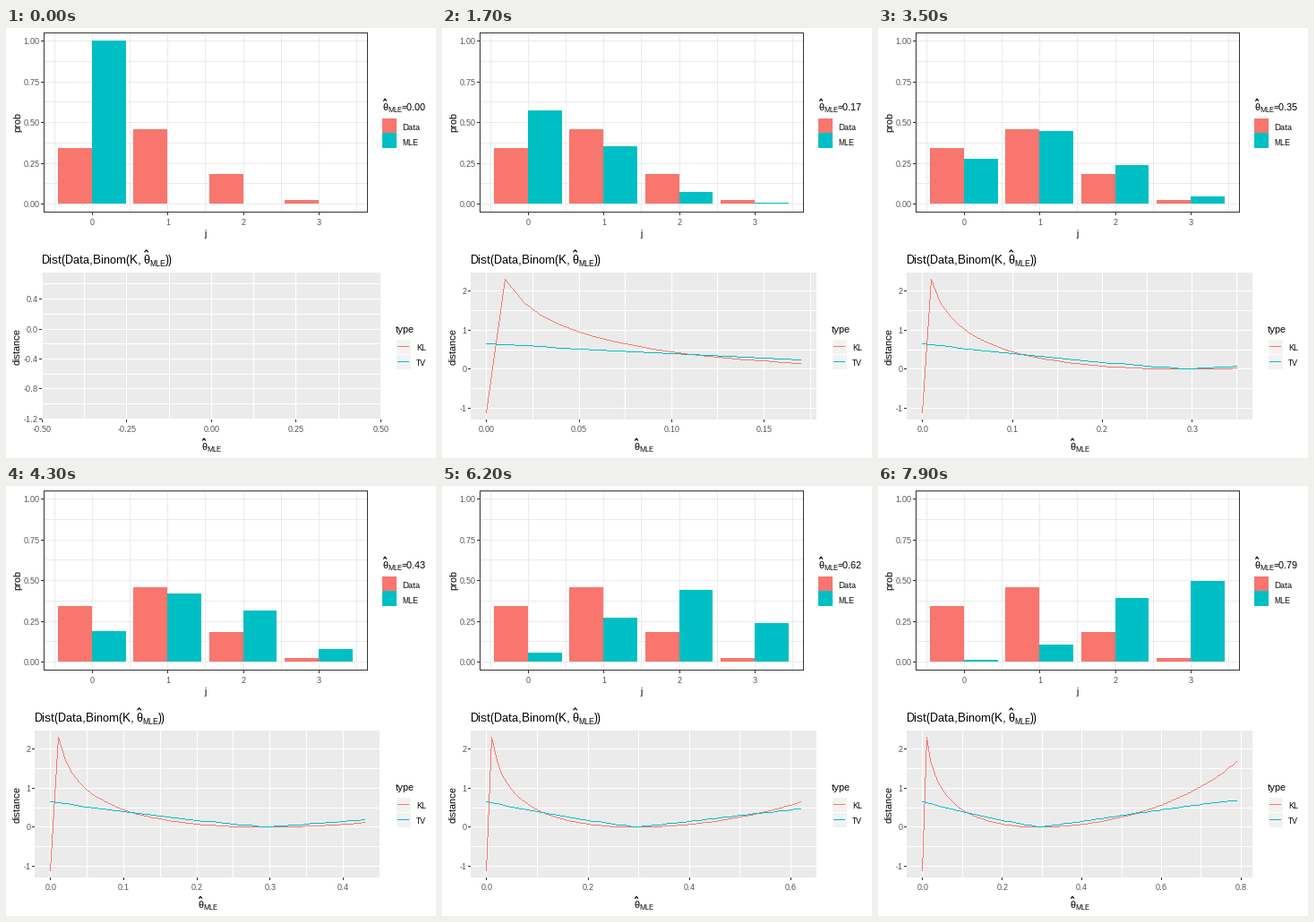
These frames come from a looping animation (480x480 px, 8000 ms). A matplotlib script:

```python
import math
from itertools import product

import numpy as np
import matplotlib.pyplot as plt
from matplotlib.animation import FuncAnimation
from matplotlib.lines import Line2D
from matplotlib.patches import Rectangle

SIZE, DPI, FRAMES = 480, 80, 80
PX = 72 / DPI  # points per pixel
RED, TEAL = "#F8766D", "#00BFC4"
GREY92, GREY95, GREY20, GREY30 = "#EBEBEB", "#F2F2F2", "#333333", "#4D4D4D"
TICK, BASE, TITLE = 9, 11, 13

K = 3
DATA = np.array([0.34, 0.456, 0.18, 0.024])

plt.rcParams.update({
    "font.family": "Liberation Sans",
    "text.hinting": "native",
    "text.hinting_factor": 1,
})
fig = plt.figure(figsize=(SIZE / DPI, SIZE / DPI), dpi=DPI, facecolor="white")
ax = fig.add_axes([0, 0, 1, 1])
canvas = ax.imshow(np.zeros((SIZE, SIZE, 4), np.uint8), zorder=2,
                   extent=(0, SIZE, SIZE, 0), aspect="auto",
                   interpolation="nearest")
ax.set_xlim(0, SIZE)
ax.set_ylim(SIZE, 0)
ax.axis("off")


# ---- statistics -----------------------------------------------------------

def binom(theta):
    return np.array([math.comb(K, j) * theta**j * (1 - theta)**(K - j)
                     for j in range(K + 1)])


def kl(theta):
    q = binom(theta)
    cross = DATA @ np.log(q) if theta > 0 else 0
    return float(DATA @ np.log(DATA) - cross)


def tv(theta):
    return float(np.abs(DATA - binom(theta)).sum() / 2)


THETA = np.arange(FRAMES) / 100
KL = np.array([kl(t) for t in THETA])
TV = np.array([tv(t) for t in THETA])


# ---- axis breaks (extended Wilkinson labelling) ---------------------------

def extended(lo, hi, m=5):
    steps = (1, 5, 2, 2.5, 4, 3)
    span, best, found = hi - lo, -2, (0, 1, 1)
    for j, (i, q), k in product((1, 2), enumerate(steps), range(2, 11)):
        z0 = math.ceil(math.log10(span / (k + 1) / (j * q)))
        for z in (z0, z0 + 1):
            step = j * q * 10.0**z
            first = math.floor(hi / step) * j - (k - 1) * j
            last = math.ceil(lo / step) * j
            for start in range(first, last + 1):
                a = start * step / j
                b = a + step * (k - 1)
                has_zero = start % j == 0 and a <= 1e-12 and b >= -1e-12
                simple = 1 - i / (len(steps) - 1) - j + has_zero
                cover = 1 - 0.5 * ((hi - b)**2 + (lo - a)**2) / (0.1 * span)**2
                ratio = (k - 1) / (b - a) * (max(b, hi) - min(a, lo)) / (m - 1)
                dense = 2 - max(ratio, 1 / ratio)
                score = 0.25 * simple + 0.2 * cover + 0.5 * dense + 0.05
                if score > best + 1e-12:
                    best, found = score, (a, step, k)
    a, step, k = found
    return [round(a + n * step, 9) + 0.0 for n in range(k)]


def breaks(lo, hi):
    major = [b for b in extended(lo, hi) if lo <= b <= hi]
    step = major[1] - major[0]
    mids = [major[0] - step / 2] + [b + step / 2 for b in major]
    return major, [b for b in mids if lo <= b <= hi]


def labels(values):
    digits = next(d for d in range(8)
                  if all(abs(v - round(v, d)) < 1e-8 for v in values))
    return [f"{v:.{digits}f}" for v in values]


def expand(lo, hi):
    pad = 0.05 * (hi - lo)
    return (lo - pad, hi + pad) if hi > lo else (lo - 0.5, hi + 0.5)


# ---- drawing helpers ------------------------------------------------------

def rect(x0, y0, x1, y1, color, z=1):
    x0, y0, x1, y1 = (math.floor(v) for v in (x0, y0, x1, y1))
    return ax.add_patch(Rectangle((x0, y0), x1 - x0, y1 - y0, fc=color,
                                  lw=0, antialiased=False, zorder=z))


def hline(x0, x1, y, color, z=1):
    return rect(x0, y, x1, y + 1, color, z)


def vline(x, y0, y1, color, z=1):
    return rect(x, y0, x + 1, y1, color, z)


def text(x, y, s, size=BASE, color="black", ha="left", rotation=0):
    return ax.text(x, y, s, size=size * PX, color=color, ha=ha, va="baseline",
                   rotation=rotation, rotation_mode="anchor")


def paint(img, x, y, color):
    """One-pixel polyline without smoothing."""
    rgba = [int(color[n:n + 2], 16) for n in (1, 3, 5)] + [255]
    pts = np.floor(np.column_stack([x, y])).astype(int)
    for a, b in zip(pts, pts[1:]):
        n = np.abs(b - a).max() + 1
        px, py_ = np.rint(np.linspace(a, b, n)).astype(int).T
        img[py_, px] = rgba


def theta_hat(x, y, size):
    """Theta with a hat and the subscript MLE, baseline at y."""
    mid, top, w = x + 0.28 * size, y - 1.17 * size, 0.16 * size
    hat = Line2D([mid - w, mid, mid + w], [top + 2.5, top, top + 2.5],
                 color="black", lw=1.2 * PX, solid_capstyle="butt")
    return [
        text(x, y, "θ", size),
        ax.add_line(hat),
        text(x + 0.556 * size, y + 0.2 * size, "MLE", round(0.7 * size)),
    ]


def scale(lo, hi, p0, p1):
    return lambda v: p0 + (np.asarray(v) - lo) / (hi - lo) * (p1 - p0)


def grid(xs, ys, xt, yt, box, color):
    x0, y0, x1, y1 = box
    out = [vline(xs(v), y0, y1, color) for part in xt for v in part]
    return out + [hline(x0, x1, ys(v), color) for part in yt for v in part]


def ticks(xs, ys, xt, yt, box):
    x0, _, _, y1 = box
    out = []
    for v, s in zip(xt, labels(xt)):
        out += [vline(xs(v), y1, y1 + 3, GREY20),
                text(xs(v), y1 + 14, s, TICK, GREY30, "center")]
    for v, s in zip(yt, labels(yt)):
        out += [hline(x0 - 3, x0, ys(v), GREY20),
                text(x0 - 4.6, math.floor(ys(v)) + 4, s, TICK, GREY30, "right")]
    return out


# ---- static parts ---------------------------------------------------------

TOP = (42, 5, 404, 206)
jx = scale(-0.645, 3.645, 42.12, 403.62)
py = scale(-0.05, 1.05, 205.7, 5.5)


def bars(values, offset, color):
    return [rect(jx(j + offset), py(v), jx(j + offset + 0.45), py(0), color)
            for j, v in enumerate(values)]


def draw_static():
    xt, yt = breaks(-0.645, 3.645), breaks(-0.05, 1.05)
    grid(jx, py, xt, yt, TOP, GREY92)
    ticks(jx, py, xt[0], yt[0], TOP)
    bars(DATA, -0.45, RED)
    x0, y0, x1, y1 = TOP
    for y in (y0, y1 - 1):
        hline(x0, x1, y, GREY20, 2)
    for x in (x0, x1 - 1):
        vline(x, y0, y1, GREY20, 2)
    text(222.5, 233, "j", ha="center")
    text(16, 105.5, "prob", ha="center", rotation=90)
    text(16, 355.5, "distance", ha="center", rotation=90)

    theta_hat(420, 92, BASE)
    rect(420, 101, 436, 117, RED)
    rect(420, 117, 436, 134, TEAL)
    text(442, 114, "Data", TICK)
    text(442, 131, "MLE", TICK)

    text(435, 340, "type")
    for y, color, name in ((347, RED, "KL"), (364, TEAL, "TV")):
        rect(436, y + 1, 452, y + 17, GREY95)
        hline(437, 450, y + 8, color)
        text(458, y + 13, name, TICK)


# ---- per-frame parts ------------------------------------------------------

live = []


def draw_distance(i):
    box = (32 if i else 40, 273, 418, 437)
    x0, y0, x1, y1 = box
    seen = np.r_[KL[:i + 1], TV[:i + 1]]
    xlim, ylim = expand(0, THETA[i]), expand(seen.min(), seen.max())
    xs = scale(*xlim, x0 + 0.4, x1 + 0.4)
    ys = scale(*ylim, y1 + 0.4, y0 + 0.4)
    xt, yt = breaks(*xlim), breaks(*ylim)

    out = [rect(*box, GREY92)]
    out += grid(xs, ys, xt, yt, box, "white")
    out += ticks(xs, ys, xt[0], yt[0], box)

    img = np.zeros((SIZE, SIZE, 4), np.uint8)
    for values, color in ((KL, RED), (TV, TEAL)):
        paint(img, xs(THETA[:i + 1]), ys(values[:i + 1]), color)
    canvas.set_data(img)

    out.append(text(x0, 263, "Dist(Data,Binom(K,", TITLE))
    out += theta_hat(x0 + 113, 263, TITLE)
    out.append(text(x0 + 138, 263, "))", TITLE))
    out += theta_hat((x0 + x1) / 2 - 11, 471, BASE)
    return out


def draw(i):
    while live:
        live.pop().remove()
    live.extend(bars(binom(THETA[i]), 0, TEAL))
    live.append(text(442, 92, f"={THETA[i]:.2f}"))
    live.extend(draw_distance(i))
    return live


draw_static()
anim = FuncAnimation(fig, draw, frames=FRAMES, init_func=lambda: live,
                     interval=100, repeat=True, repeat_delay=0, blit=False)
plt.show()
```
